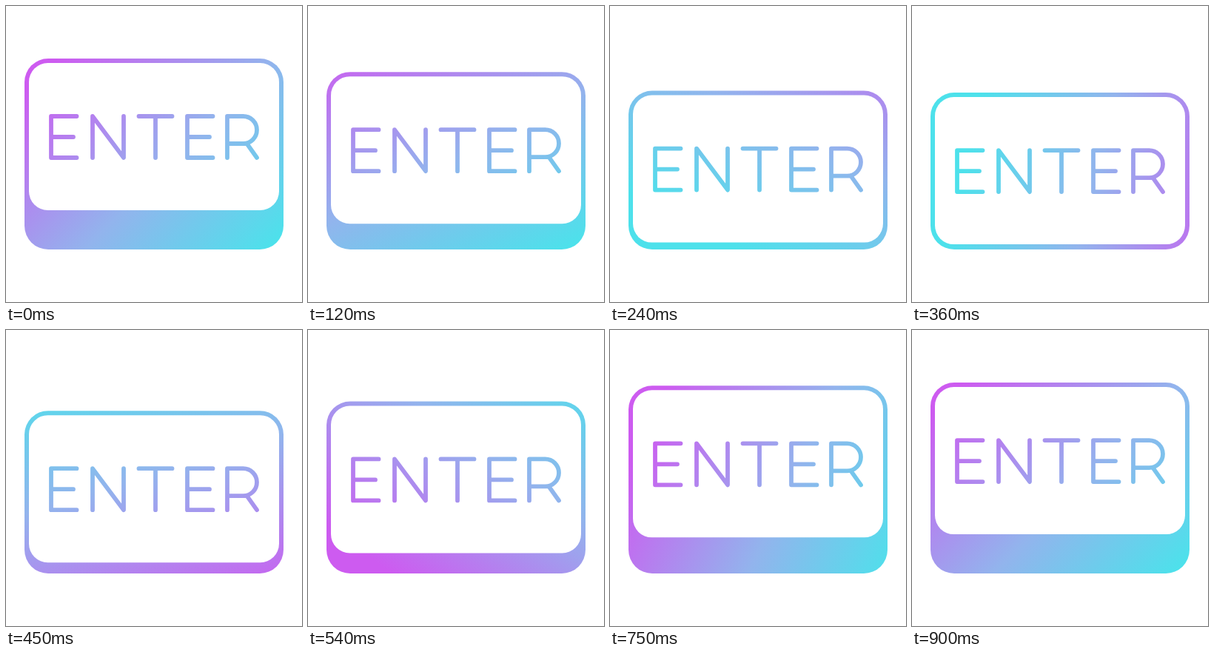
These frames come from a looping animation (400 by 400 pixels, 0.93 s). An HTML page:

```html
<!DOCTYPE html>
<html lang="en">
<head>
<meta charset="utf-8">
<title>Enter key</title>
<style>
  html, body { margin: 0; width: 100%; height: 100%; overflow: hidden; background: #fff; }
  svg { display: block; width: 100vw; height: 100vh; }
</style>
</head>
<body>
<svg viewBox="0 0 400 400" role="img" aria-label="ENTER">
  <defs>
    <linearGradient id="tint" gradientUnits="userSpaceOnUse">
      <stop offset="0" stop-color="#cd5bf0"/>
      <stop offset=".545" stop-color="#92b4ed"/>
      <stop offset="1" stop-color="#4de1eb"/>
    </linearGradient>
    <mask id="key" maskUnits="userSpaceOnUse" x="0" y="0" width="400" height="400">
      <rect id="body" x="25" width="350" rx="32" fill="#fff"/>
      <g id="cap">
        <rect x="31" y="77" width="338" height="199" rx="25.5"/>
        <g fill="none" stroke="#fff" stroke-width="5.8" stroke-linecap="round" stroke-linejoin="round">
          <path id="e" d="M95.5 149H61V205H95.5M61 177H91"/>
          <path d="M117 205V149L159 205V149"/>
          <path d="M179.500 149H224.500M202 149V205"/>
          <use href="#e" x="184"/>
          <path d="M299 205V149H320.500A18.500 18.500 0 0 1 320.500 186H299M325.500 186L339 205"/>
        </g>
      </g>
    </mask>
  </defs>
  <rect width="400" height="400" fill="url(#tint)" mask="url(#key)"/>
</svg>
<script>
const LOOP = 930, STEP = 30;
const TOP = 71, BOTTOM = 329, TRAVEL = 47.5, TURN_AT = 300;
const CENTER = { x: 260, y: 176 }, TO_VIOLET = 210, TO_CYAN = 175;
const [tint, body, cap] = ['tint', 'body', 'cap'].map(id => document.getElementById(id));

// cubic-bezier(1/3, 0, x2, 1)
function ease(u, x2) {
  if (u <= 0) return 0;
  if (u >= 1) return 1;
  let lo = 0, hi = 1, s;
  for (let i = 0; i < 24; i++) {
    s = (lo + hi) / 2;
    const r = 1 - s;
    const x = s * r * r + 3 * x2 * s * s * r + s * s * s;
    if (x < u) lo = s; else hi = s;
  }
  return s * s * (3 - 2 * s);
}

function press(t) {
  const down = ease(t / TURN_AT, 0.6);
  const up = ease((t - TURN_AT) / (LOOP - TURN_AT), 0.4);
  return TRAVEL * (down - up);
}

function setAttrs(el, attrs) {
  for (const name in attrs) el.setAttribute(name, attrs[name]);
}

function draw(t) {
  const y = press(t);
  setAttrs(body, { y: TOP + y, height: BOTTOM - TOP - y });
  setAttrs(cap, { transform: `translate(0 ${y})` });

  // The colours make one clockwise turn per loop.
  const angle = (225 + 360 * ease(t / LOOP, 0.5)) * Math.PI / 180;
  const dx = Math.cos(angle), dy = Math.sin(angle);
  setAttrs(tint, {
    x1: CENTER.x + TO_VIOLET * dx, y1: CENTER.y + TO_VIOLET * dy,
    x2: CENTER.x - TO_CYAN * dx, y2: CENTER.y - TO_CYAN * dy
  });
}

const start = performance.now();
function tick() {
  const t = (performance.now() - start) % LOOP;
  draw(Math.floor(t / STEP) * STEP);
  requestAnimationFrame(tick);
}
draw(0);
requestAnimationFrame(tick);
</script>
</body>
</html>
```
